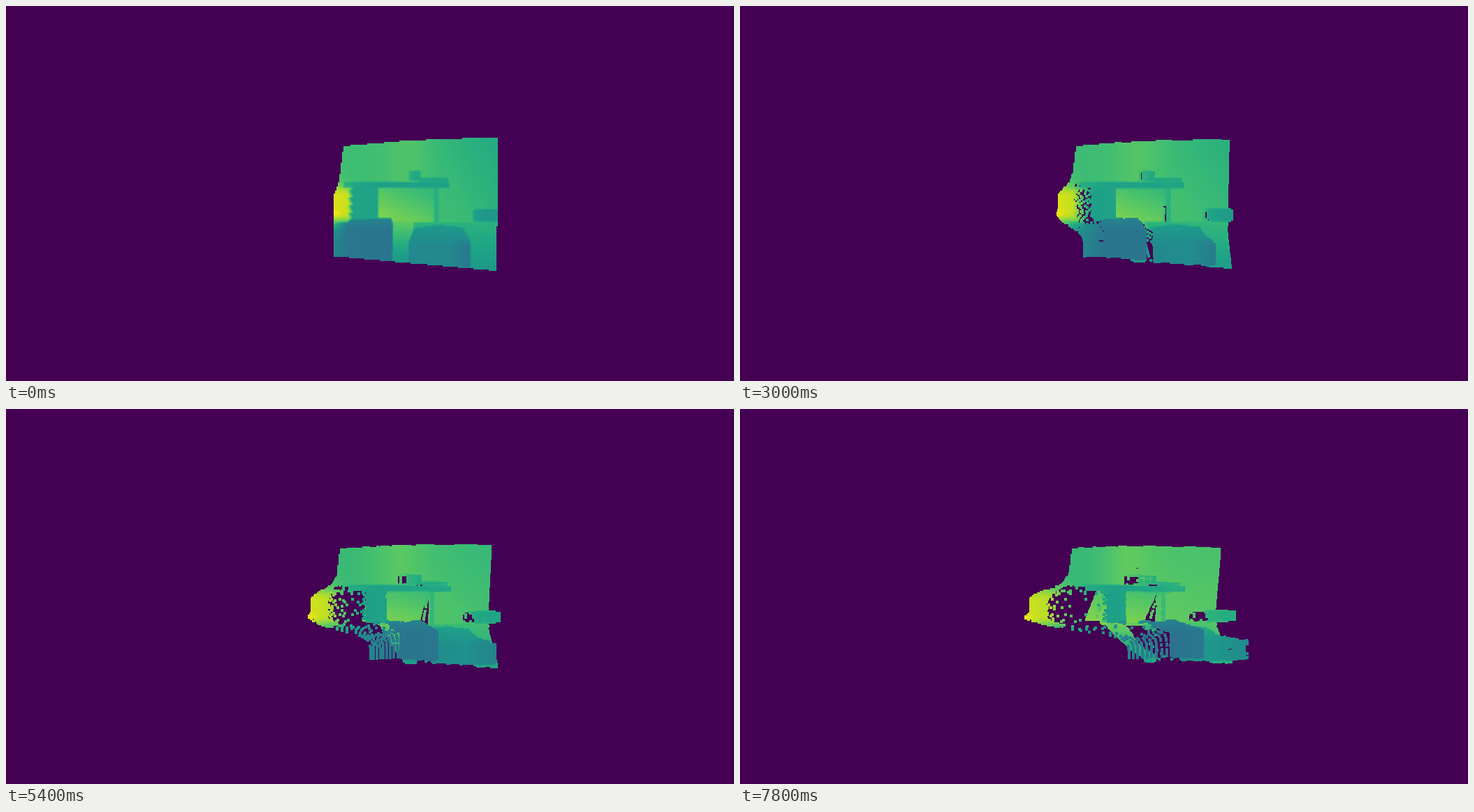
Write a matplotlib script that moves like this. It is 1042 by 538 pixels and loops after 8 s.

```python
import numpy as np
import matplotlib.pyplot as plt
from matplotlib.animation import FuncAnimation
from matplotlib.path import Path

W, H = 1042, 538
FRAMES, INTERVAL = 40, 200
MID_Y = 270

V, U = np.mgrid[184:386, 464:710].astype(float)


def ramp(x, x0, x1, y0=0, y1=1):
    return y0 + (y1 - y0) * np.clip((x - x0) / (x1 - x0), 0, 1)


def box(u0, v0, u1, v1):
    return (U >= u0) & (U < u1) & (V >= v0) & (V < v1)


def polygon(*points):
    grid = np.column_stack([U.ravel(), V.ravel()])
    return Path(points).contains_points(grid).reshape(U.shape)


def paint(layer, mask, value):
    layer[mask] = np.broadcast_to(value, layer.shape)[mask]


def soften(a):
    """Average of the 3 x 3 neighbours."""
    p = np.pad(a, 1, mode="edge")
    rows = p[:-2] + p[1:-1] + p[2:]
    return (rows[:, :-2] + rows[:, 1:-1] + rows[:, 2:]) / 9


def build_depth():
    # Left border: bright far corner, fading to wall above and sofa below
    gap = np.maximum(np.maximum(272 - V, V - 297), 0)
    glow = np.exp(-(gap / 18) ** 2)
    base = np.where(V < 280, .70, .47)
    border = base + (.95 - base) * glow

    # Wall
    wall = .69 + .035 * np.exp(-((U - 575) / 35) ** 2)
    wall -= ramp(U, 585, 705, 0, .08)
    wall += .035 * ramp(U, 600, 640) * ramp(V, 200, 300)
    t = ramp(U, 470, 495)
    depth = border * (1 - t) + wall * t

    # Recess below the shelf, and its post
    recess = ramp(U, 530, 613, .78, .70) + ramp(V, 260, 304, -.05, .04)
    paint(depth, box(529, 258, 616, 320), recess)
    paint(depth, box(613, 258, 619, 312), .63)

    # Floor, brighter between the sofas
    paint(depth, box(550, 311, 710, 386), ramp(V, 311, 375, .64, .54))
    paint(depth, box(550, 309, 584, 386), ramp(V, 309, 360, .76, .55))

    # Far corner with a knob, and the column with a ragged side
    corner = border - ramp(U, 469, 492, 0, .04)
    corner += .06 * np.exp(-((V - 297) / 4) ** 2) * ramp(U, 470, 480, 1, 0)
    paint(depth, box(464, 260, 492, 311), corner)
    start = 488 + 5 * (V / 11 % 1)
    t = ramp(U - start, 0, 6)
    paint(depth, box(488, 257, 532, 311), corner * (1 - t) + .575 * t)

    # Shelf and the things on it
    paint(depth, box(484, 253, 634, 260), ramp(U, 482, 520, .64, .57))
    paint(depth, box(577, 237, 593, 251), ramp(U, 577, 587, .645, .595))
    paint(depth, box(593, 247, 632, 254), .59)

    # Rounded object at the right wall
    item = ((U - 690) / 22) ** 4 + ((V - 300) / 9) ** 4 < 1
    paint(depth, item, ramp(U, 668, 684, .58, .53))

    # Left sofa and its side
    sofa = ramp(V, 304, 322, .46, .395) - ramp(U, 490, 552, 0, .01)
    t = ramp(U, 469, 488)
    front = border * (1 - t) + sofa * t
    paint(depth, box(464, 311, 492, 386), front)
    paint(depth, polygon((474, 390), (478, 326), (492, 307), (550, 304),
                         (553, 316), (551, 390)), front)

    # Right sofa
    sofa = ramp(V, 314, 345, .54, .47)
    sofa -= ramp(U, 636, 663, 0, .07) * ramp(V, 333, 343)
    paint(depth, polygon((575, 390), (577, 338), (584, 319), (620, 314),
                         (653, 318), (663, 336), (664, 390)), sofa)
    return soften(depth)


def outline():
    left = 470 + ramp(V, 250, 270, 7, 0) + ramp(V, 200, 250, 6, 0)
    right = ramp(V, 187, 380, 704, 701)
    top = ramp(U, 482, 575, 201, 193) - ramp(U, 575, 705, 0, 5)
    bottom = ramp(U, 469, 702, 358, 379)
    return (U >= left) & (U <= right) & (V >= top) & (V <= bottom)


depth = build_depth()
turn = (U - 520) / 1850
# Near points go right and far points left around a pivot
shift = 118 / (depth + turn) - 183
squeeze = .02 - (U - 480) / 1500 - .35 * np.clip(.6 - depth, 0, 1)
# Points on steep depth edges get lost as the view turns
stretch = np.abs(np.gradient(shift, axis=1))
cells = np.random.default_rng(4).random((101, 62))
noise = np.kron(cells, np.ones((2, 4)))[:, :U.shape[1]]
loss = np.minimum(.12 * stretch, .65)

keep = outline() & (U % 2 == 0) & (V % 2 == 0)
u, v, depth, turn, shift, squeeze, loss, noise = (
    a[keep] for a in (U, V, depth, turn, shift, squeeze, loss, noise))


def camera(step):
    """Sideways swing and tilt of the view."""
    if step <= 7:
        swing = -.25 * np.sin(2 * np.pi * step / 7)
    elif step <= 15:
        swing = ramp(step, 7, 15, 0, .26)
    else:
        swing = .26 + .74 * ((step - 15) / 24) ** 1.15
    return swing, np.exp(-((step - 8) / 3) ** 2)


def render(step):
    swing, tilt = camera(step)
    x = u + swing * shift
    y = v + swing * (v - MID_Y) * squeeze - 40 * tilt * (.64 - depth)
    tone = depth + swing * turn
    # Far points first, so near ones cover them
    order = np.argsort(-tone, kind="stable")
    order = order[(noise >= swing * loss)[order]]
    x = np.rint(x[order]).astype(int)
    y = np.rint(y[order]).astype(int)
    span = np.arange(-1, 3 if swing > .2 else 2)
    dy, dx = (d.ravel() for d in np.meshgrid(span, span))
    stage = np.zeros((H, W))
    rows = (y[:, None] + dy).ravel()
    cols = (x[:, None] + dx).ravel()
    stage[rows, cols] = np.repeat(tone[order], dx.size)
    return stage


fig = plt.figure(figsize=(W / 100, H / 100), dpi=100)
ax = fig.add_axes([0, 0, 1, 1])
ax.axis("off")
picture = ax.imshow(render(0), cmap="viridis", vmin=0, vmax=1,
                    interpolation="nearest", aspect="auto")


def update(step):
    picture.set_data(render(step))
    return [picture]


anim = FuncAnimation(fig, update, frames=FRAMES, interval=INTERVAL,
                     repeat=True, repeat_delay=0, blit=False)
plt.show()
```
